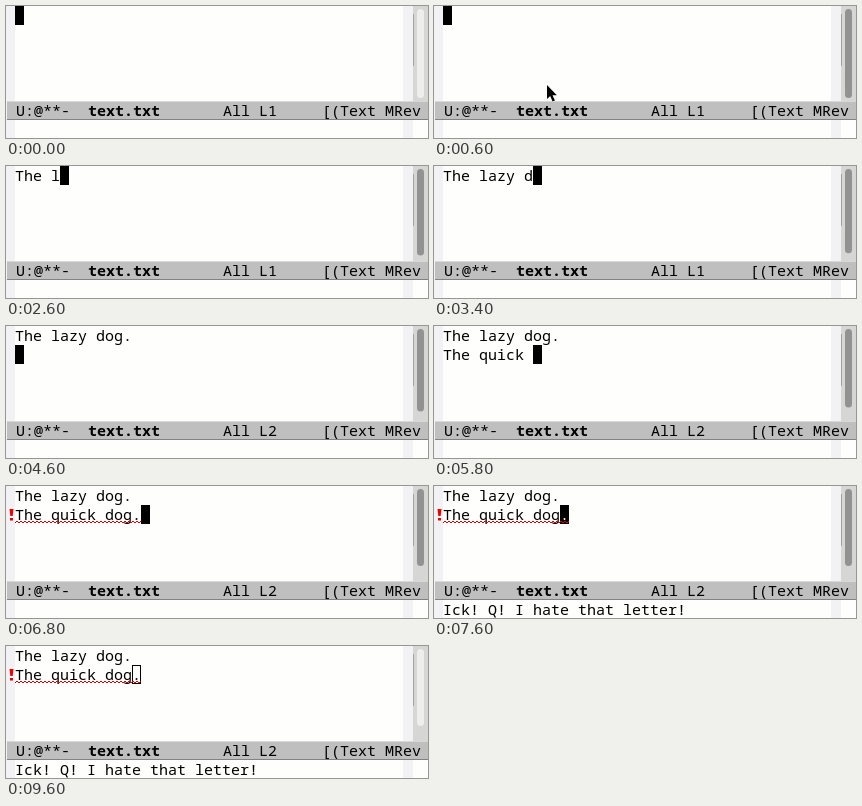
Write an HTML page that moves like this. It is 422x132 px and loops after 9800 ms.

```html
<!DOCTYPE html>
<html lang="en">
<head>
<meta charset="utf-8">
<title>Editor typing loop</title>
<style>
  html, body { margin: 0; width: 100%; height: 100%; overflow: hidden; background: #fefefc; }
  svg { display: block; width: 422px; height: 132px; }
  text { font: 15px "Noto Sans Mono", "DejaVu Sans Mono", monospace; fill: #000; white-space: pre; }
  .bold { font-weight: 700; }
</style>
</head>
<body>
<svg viewBox="0 0 422 132">
  <rect width="422" height="132" fill="#fefefc"/>
  <rect width="9" height="132" fill="#f2f2f5"/>
  <rect x="397" width="10" height="132" fill="#f2f2f5"/>

  <rect x="407" width="15" height="95" fill="#d6d6d5"/>
  <rect x="407" y="8" width="1" height="52" fill="#a2a2a2"/>
  <rect id="thumb" x="411" y="3" width="7" rx="3.5"/>

  <rect x="1" y="95" width="421" height="19" fill="#bfbfbf"/>
  <rect x="1" y="95" width="421" height="1" fill="#d8d8d8"/>
  <rect x="1" y="113" width="421" height="1" fill="#828282"/>
  <text x="10" y="110">U:@**-</text>
  <text class="bold" x="82" y="110">text.txt</text>
  <text x="217" y="110">All</text>
  <text id="lineNo" x="253" y="110"></text>
  <text x="316" y="110">[(Text MRev</text>

  <text id="row0" x="9" y="15"></text>
  <text id="row1" x="9" y="34"></text>
  <rect id="caret" width="9" height="19"/>
  <rect id="hollow" x="126.5" y="19.5" width="8" height="18" fill="none" stroke="#000"/>
  <text id="under" x="126" y="34" style="fill:#fefefc">.</text>

  <g id="error">
    <path id="wave" fill="none" stroke="#e00000"/>
    <path d="M3.5 23h4l-.8 7h-2.4zM4 32h3v2.5h-3z" fill="#f00000"/>
  </g>
  <text id="echo" x="9" y="129">Ick! Q! I hate that letter!</text>

  <path id="arrow" d="M113 79v14l3.2-3 2.4 5.5 2.3-1-2.4-5.3h4.3z" stroke="#fff" paint-order="stroke"/>
  <path id="beam" d="M19.5 57.5h2l.5.5.5-.5h2M22 58v14M19.5 72.5h2l.5-.5.5.5h2" fill="none" stroke="#000"/>
</svg>
<script>
const LOOP = 9800, CELL = 9, ROW = 19;
const STORY = "The lazy dog.\nThe quick dog.";

// [time, characters typed so far]
const KEYS = [
  [2200, 1], [2400, 3], [2600, 5], [2800, 6], [3000, 8], [3200, 9],
  [3400, 10], [3600, 12], [3800, 13], [4600, 14],
  [4800, 16], [5000, 18], [5200, 19], [5400, 20], [5600, 22],
  [5800, 24], [6000, 26], [6200, 28]
];

const $ = id => document.getElementById(id);
const set = (id, name, value) => $(id).setAttribute(name, value);
const show = (id, on) => set(id, "visibility", on ? "visible" : "hidden");

let zigzag = "M9 37";
for (let x = 11, up = true; x <= 135; x += 2, up = !up) zigzag += `L${x} ${up ? 35 : 37}`;
set("wave", "d", zigzag);

function draw(t) {
  let count = 0;
  for (const [at, n] of KEYS) if (t >= at) count = n;
  const lines = STORY.slice(0, count).split("\n");
  const row = lines.length - 1;
  const focused = t >= 200 && t < 9600;
  const jumped = t >= 7600;
  const col = jumped ? 13 : lines[row].length;

  $("row0").textContent = lines[0];
  $("row1").textContent = lines[1] || "";
  $("lineNo").textContent = "L" + (row + 1);

  set("caret", "x", 9 + col * CELL);
  set("caret", "y", row * ROW);
  show("caret", t < 9600);
  show("hollow", t >= 9600);
  show("under", jumped && t < 9600);

  set("thumb", "height", 89 * 180 / (180 + count));
  set("thumb", "fill", focused ? "#929292" : "#eeeeec");

  show("error", t >= 6800);
  show("echo", jumped);
  show("arrow", t >= 600 && t < 2200);
  show("beam", t >= 8400 && t < 8600);
}

const start = performance.now();
function tick() {
  draw((performance.now() - start) % LOOP);
  requestAnimationFrame(tick);
}
draw(0);
requestAnimationFrame(tick);
</script>
</body>
</html>
```
